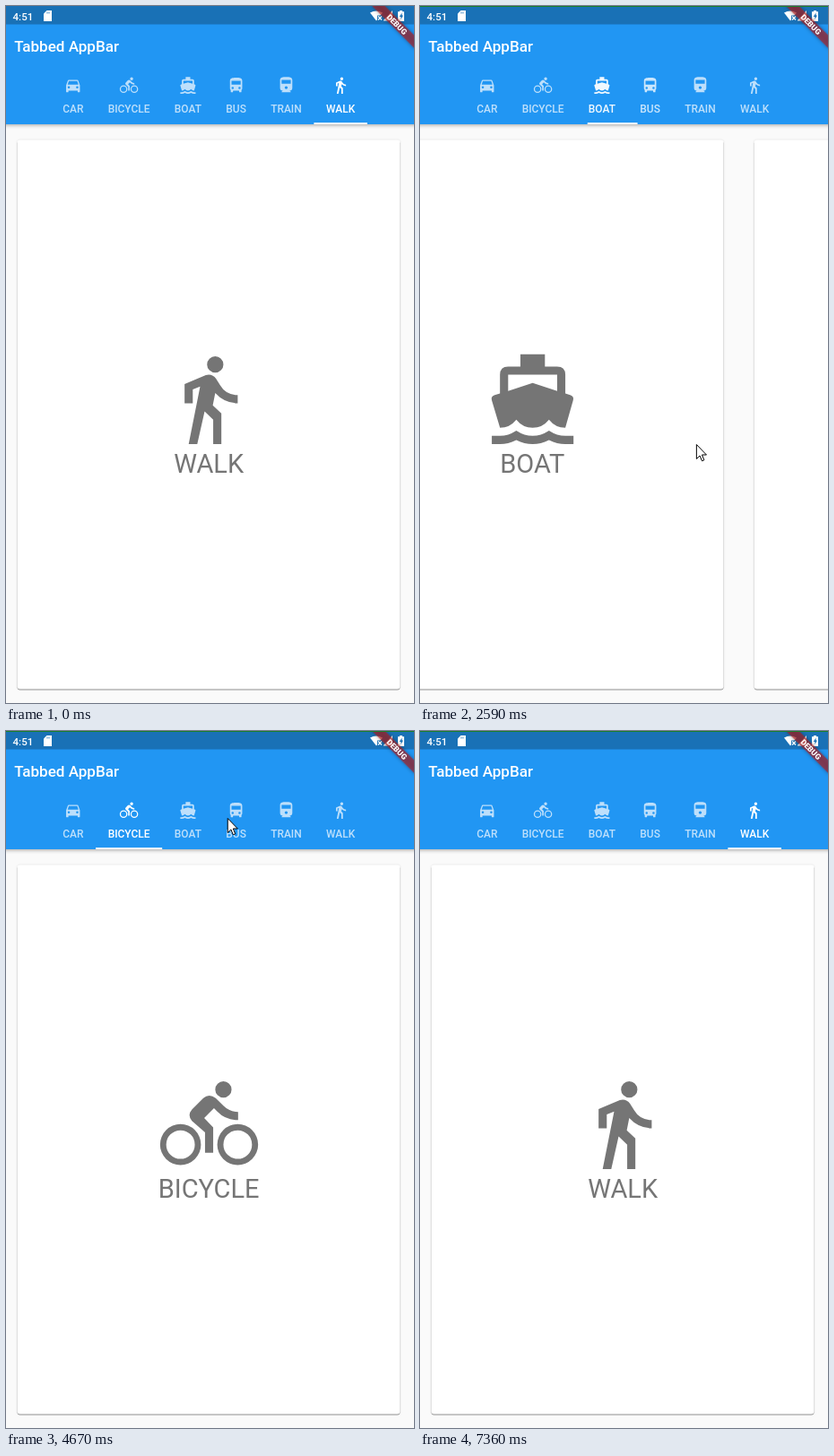
Write an HTML page that moves like this. It is 455x778 px and loops after 8680 ms.

```html
<!DOCTYPE html>
<html lang="en">
<head>
<meta charset="utf-8">
<title>Tabbed AppBar</title>
<style>
html, body { margin: 0; width: 100%; height: 100%; overflow: hidden; background: #fafafa; }
svg { display: block; }
text { font-family: Roboto, sans-serif; }
.card { fill: #fff; filter: drop-shadow(.2px 1px .6px rgba(0,0,0,.38)) drop-shadow(0 0 1px rgba(0,0,0,.12)); }
.bar { fill: #2196f3; filter: drop-shadow(0 1.5px 2px rgba(0,0,0,.35)); }
.page { fill: #757575; font-size: 29px; text-anchor: middle; }
.tab { fill: #fff; font-size: 11.96px; font-weight: 500; text-anchor: middle; }
.title { fill: #fff; font-size: 17.08px; font-weight: 500; }
.clock { fill: #fff; font-size: 11.6px; font-weight: 500; }
.debug { fill: #fff; font-size: 8.7px; font-weight: 900; text-anchor: middle; }
.band { fill: #b71c1c; fill-opacity: .63; filter: drop-shadow(0 0 2px rgba(0,0,0,.5)); }
</style>
</head>
<body>
<svg width="455" height="778">
  <rect width="455" height="778" fill="#fafafa"/>
  <g id="pages"></g>
  <ellipse id="glow" cx="455" cy="455" ry="370" fill="#2196f3" fill-opacity=".06"/>
  <rect class="bar" x="-9" y="-9" width="473" height="141"/>
  <g id="ripples"></g>
  <g id="tabs"></g>
  <rect id="line" y="130.2" height="1.8" fill="#fff"/>
  <text class="title" x="9.2" y="51">Tabbed AppBar</text>
  <rect width="455" height="20.5" fill="#1971b6"/>
  <text class="clock" x="7.5" y="15.6">4:51</text>
  <g fill="#fff">
    <path d="M45.5 5H51V17H42V8.5Z"/>
    <path d="M406 7.6Q413 3.2 420 7.6L413 16.5Z"/>
    <path d="M431 5V16.5H420.5Z"/>
    <path d="M439 5h3v1.2h2V17h-7V6.2h2Z"/>
  </g>
  <path d="M46 6.5v2M48 6.5v2" stroke="#1971b6" stroke-width=".8"/>
  <path d="M414 10.5h7v7h-7Z" fill="#1971b6"/>
  <path d="M415 11.5l4 4m0-4l-4 4" stroke="#fff" stroke-width="1.3"/>
  <path d="M441.5 7.5l-2.7 4.6h1.6v3l2.6-4.6h-1.5Z" fill="#1971b6"/>
  <g transform="translate(456.5 0) rotate(45)">
    <rect class="band" x="-34.2" y="23.9" width="68.4" height="10.25"/>
    <text class="debug" y="32.2">DEBUG</text>
  </g>
  <rect id="edge" width="455" height="1" fill="#1b7d2c"/>
  <path id="cursor" d="M.5.5V16.5L4.2 13 6.6 18.8 9 17.8 6.6 12H11.6Z" fill="#fff" stroke="#000"/>
</svg>
<script>
const LOOP = 8680, STEP = 230 / 3, PITCH = 461, MID = 226.2;
const $ = id => document.getElementById(id);

const clamp = u => Math.min(1, Math.max(0, u));
const ease = u => (u = clamp(u), u * u * (3 - 2 * u));
const mix = (a, b, u) => a + (b - a) * u;
// Applies moves of [start, duration, goal] one after another
const follow = (v, t, moves) =>
  moves.reduce((from, [start, span, to]) => mix(from, to, ease((t - start) / span)), v);

// Icons on a 24-unit grid, holes by the even-odd rule
const dot = (x, y, r) => `M${x - r} ${y}a${r} ${r} 0 1 0 ${2 * r} 0a${r} ${r} 0 1 0 ${-2 * r} 0z`;
const box = (x, y, w, h) => `M${x} ${y}h${w}v${h}h${-w}z`;
const wheel = x => dot(x, 17, 5) + dot(x, 17, 3.5);
const lamps = (x, y) => dot(x, y, 1.5) + dot(24 - x, y, 1.5);
const foot = 'q0 1 1 1h1q1 0 1-1';
const roof = 'c0-3.5-3.6-4-8-4s-8 .5-8 4z';
const icons = {
  CAR: `M18.9 6Q18.5 5 17.5 5h-11Q5.5 5 5.1 6L3 12v8${foot}v-1h12v1${foot}v-8z`
    + 'M5 11l1.5-4.5h11L19 11z' + lamps(6.5, 14.5),
  BICYCLE: dot(15.5, 3.5, 2) + wheel(5) + wheel(19)
    + 'M10.8 10.5l2.4-2.4.8.8q2 2.1 5.1 2.1V9q-2.1 0-3.6-1.5l-1.9-1.9q-1.6-1.2-3 0L7.8 8.4q-1.2 1.4 0 2.8L11 14v5h2v-6.2z',
  BOAT: 'M2 23h2q2 0 4-1q4 2 8 0q2 1 4 1h2v-2h-2q-2 0-4-1.3q-4 2.6-8 0Q6 21 4 21H2z'
    + 'M4 19q2.4 0 4-2q1.6 2 4 2t4-2q1.6 2 4 2l1.9-6.7q.3-1-.7-1.3L20 10.6V6q0-2-2-2h-3V1H9v3H6q-2 0-2 2v4.6L2.7 11q-1 .3-.7 1.3z'
    + 'M6 6h12v4l-6-2-6 2z',
  BUS: `M4 16q0 1.3 1 2.2V20${foot}v-1h8v1${foot}v-1.8q1-.9 1-2.2V6${roof}` + box(6, 6, 12, 5) + lamps(7.5, 15.5),
  TRAIN: `M4 15.5a3.5 3.5 0 0 0 3.5 3.5L6 20.5v.5h12v-.5L16.5 19a3.5 3.5 0 0 0 3.5-3.5V5${roof}`
    + box(6, 5, 12, 5) + dot(12, 15, 2),
  WALK: dot(13.5, 3.5, 2)
    + 'M9.8 8.9L7 23h2.1l1.8-8 2.1 2v6h2v-7.5l-2.1-2 .6-3Q15.8 13 19 13v-2q-2.9 0-4.3-2.4l-1-1.6q-.9-1.3-2.5-.9L6 8.3V13h2V9.6z'
};
const icon = (d, x, y, k) =>
  `<path d="${d}" fill-rule="evenodd" transform="translate(${x - 12 * k} ${y}) scale(${k})"/>`;

// Tabs are as wide as their labels plus padding, centred as a row
const pen = document.createElement('canvas').getContext('2d');
pen.font = '500 11.96px Roboto, sans-serif';
const items = Object.entries(icons).map(([name, d]) => ({ name, d, width: pen.measureText(name).width + 27.3 }));
let edge = MID - items.reduce((sum, item) => sum + item.width, 0) / 2;
for (const item of items) {
  item.left = edge;
  item.x = edge + item.width / 2;
  edge += item.width;
}

// Five drags back to the first page, then a tap on each later tab
const DRAG = 1333, BEAT = 470;
const drags = [4, 3, 2, 1, 0].map((page, i) => [DRAG + BEAT * i, 450, page]);
const taps = [3900, 4670, 5400, 5830, 6210].map((start, i) => ({ start, page: i + 1, tab: items[i + 1] }));
const turns = [...drags, ...taps.map(({ start, page }) => [start + 110, 300, page])];
const hops = taps.slice(1).map(({ start, tab }, i) => [start - 170 - (i ? 0 : 500), 220, tab.x]);
// The pointer runs ahead of the screen: it moves on to the next tab as a ripple starts
const ahead = taps.slice(1).map(({ start }, i) => [start - 170, 220, items[Math.min(5, i + 3)].x + 1]);

function pointer(t) {
  const swing = 251 + 91 * Math.cos((t - 2050) / BEAT * 2 * Math.PI);
  return [
    follow(456, t, [[70, 900, 237], [1130, 200, swing], [3450, 350, items[1].x], hops[0], ...ahead,
      [6330, 170, 407], [6500, 220, 376], [6900, 440, 384]]),
    follow(560, t, [[70, 900, 508], [1500, 1540, 484], [3450, 350, 97], [4700, 700, 102],
      [6500, 220, 168], [6900, 440, 790]])
  ];
}

$('pages').innerHTML = items.map(({ name, d }, i) =>
  `<g class="page" transform="translate(${i * PITCH} 0)">
    <rect class="card" x="12.6" y="149.5" width="426.8" height="613" rx="3"/>
    ${icon(d, MID + .3, 384.2, 4.555)}<text x="${MID}" y="521">${name}</text></g>`).join('');
$('tabs').innerHTML = items.map(({ name, d, x }) =>
  `<g class="tab">${icon(d, x, 78.3, .854)}<text x="${x}" y="118.5">${name}</text></g>`).join('');
$('ripples').innerHTML = taps.map(({ tab }) =>
  `<svg x="${tab.left}" y="69" width="${tab.width}" height="63">
    <circle cx="${tab.width / 2 + 4}" cy="31" fill="#fff"/></svg>`).join('');
const tabs = [...$('tabs').children];
const ripples = [...$('ripples').querySelectorAll('circle')];

const set = (node, values) => {
  for (const key in values) node.setAttribute(key, values[key]);
};

function draw(t) {
  const pos = follow(5, t, turns), i = Math.min(4, Math.floor(pos)), [a, b] = items.slice(i, i + 2);
  set($('pages'), { transform: `translate(${-pos * PITCH} 0)` });
  tabs.forEach((tab, n) => set(tab, { opacity: .7 + .3 * clamp(1 - Math.abs(pos - n)) }));
  set($('line'), { x: mix(a.left, b.left, pos - i), width: mix(a.width, b.width, pos - i) });

  taps.forEach(({ start }, n) => {
    const age = t - start;
    set(ripples[n], {
      r: 14 + 50 * clamp(age / 500),
      opacity: .2 * clamp(age / 80) * clamp((500 - age) / 250)
    });
  });

  set($('glow'), { rx: follow(0, t, [[150, 500, 70], [650, 450, 22], [1150, 250, 0]]) });
  set($('edge'), { opacity: +(t > 50) });
  set($('cursor'), { opacity: +(t > 50 && t < 7330), transform: `translate(${pointer(t).join(' ')})` });
}

const begin = performance.now();
function frame() {
  const t = (performance.now() - begin) % LOOP;
  draw(Math.floor((t - 44) / STEP) * STEP + 57);
  requestAnimationFrame(frame);
}
frame();
</script>
</body>
</html>
```
